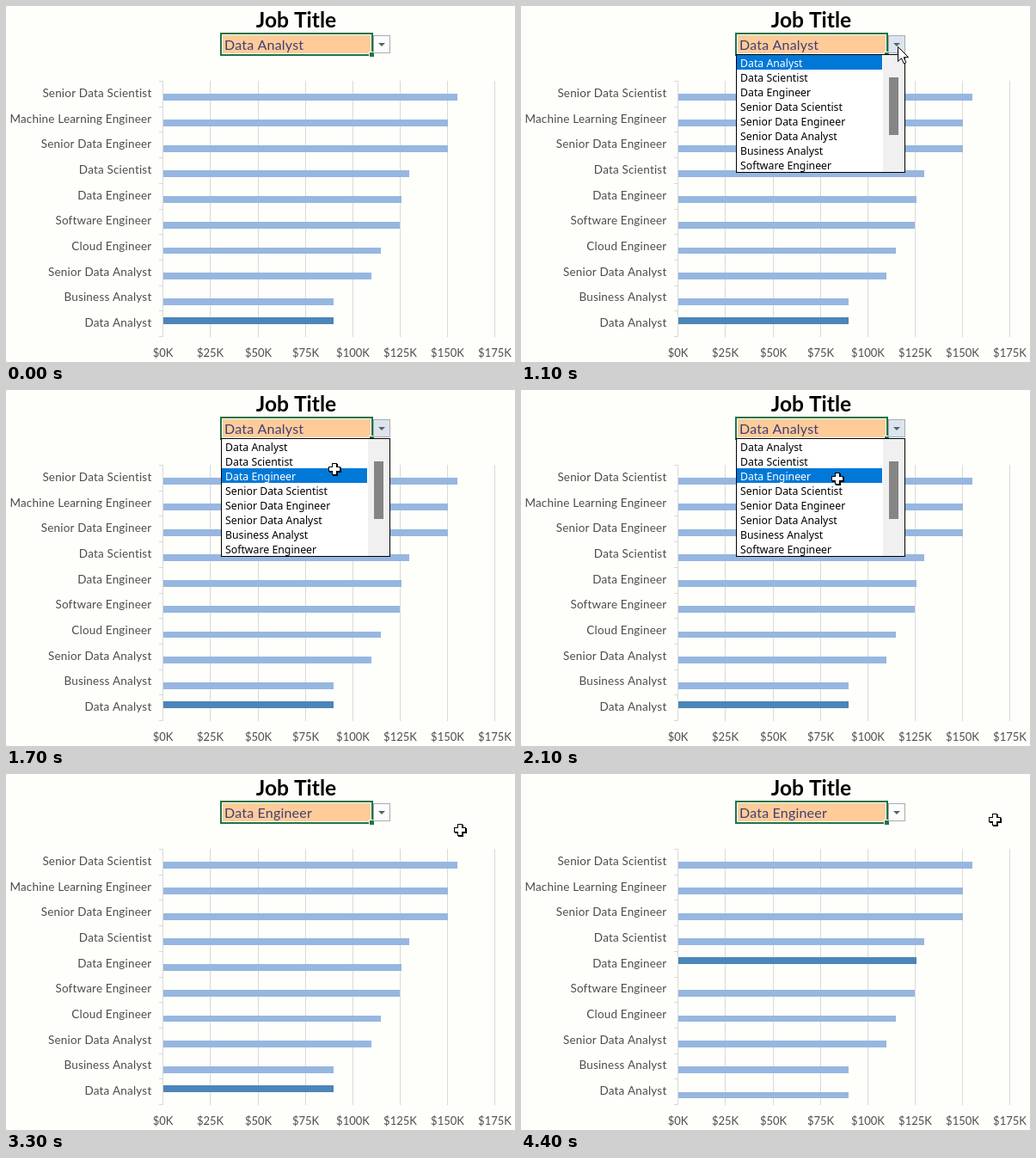
An HTML page with a canvas for the animation above (4.5 s loop, 592 by 414 pixels).

```html
<!DOCTYPE html>
<html lang="en">
<head>
<meta charset="utf-8">
<title>Job Title</title>
<style>
  html, body { margin: 0; width: 100%; height: 100%; overflow: hidden; background: #fefffb; }
  canvas { display: block; }
</style>
</head>
<body>
<canvas id="stage" width="592" height="414"></canvas>
<script>
const ctx = document.getElementById('stage').getContext('2d');
const LOOP = 4500, STEP = 100;
const LEFT = 182.3, TOP = 87.5, ROW = 29.7, BAR = 7.77, PER_K = 2.2057;
const OPEN = 1100, CLOSE = 2400, RECALC = 3400;

const salaries = [
  ['Senior Data Scientist', 155.3], ['Machine Learning Engineer', 150.2],
  ['Senior Data Engineer', 150.2], ['Data Scientist', 130],
  ['Data Engineer', 126], ['Software Engineer', 125],
  ['Cloud Engineer', 115], ['Senior Data Analyst', 110],
  ['Business Analyst', 90], ['Data Analyst', 90]
];
const options = ['Data Analyst', 'Data Scientist', 'Data Engineer', 'Senior Data Scientist',
  'Senior Data Engineer', 'Senior Data Analyst', 'Business Analyst', 'Software Engineer'];

// Pointer path: time, x, y
const path = [
  [200, 449, 2], [700, 440, 42], [900, 438, 47], [1300, 438, 47], [1500, 395, 81],
  [1900, 368, 103], [2400, 368, 103], [2700, 395, 87], [2800, 497, 73], [2900, 518, 71],
  [3100, 526, 67], [3300, 528, 65], [3600, 530, 64], [4200, 542, 58], [4400, 551, 53]
];

function pointerAt(t) {
  if (t < path[0][0]) return null;
  const next = path.findIndex(p => p[0] > t);
  if (next < 0) return path[path.length - 1].slice(1);
  const [t0, x0, y0] = path[next - 1], [t1, x1, y1] = path[next];
  const k = (t - t0) / (t1 - t0);
  return [Math.round(x0 + (x1 - x0) * k), Math.round(y0 + (y1 - y0) * k)];
}

function rect(x, y, w, h, color) {
  ctx.fillStyle = color;
  ctx.fillRect(x, y, w, h);
}

// Rectangle by its edges, snapped to whole pixels
function snapped(x0, y0, x1, y1, color) {
  const [l, t, r, b] = [x0, y0, x1, y1].map(Math.round);
  rect(l, t, r - l, b - t, color);
}

function frame(x, y, w, h, fill, border, width = 1) {
  rect(x, y, w, h, border);
  rect(x + width, y + width, w - 2 * width, h - 2 * width, fill);
}

function text(str, x, y, font, color, align = 'left', spacing = 0) {
  ctx.font = font;
  ctx.fillStyle = color;
  ctx.textAlign = align;
  ctx.letterSpacing = spacing + 'px';
  ctx.fillText(str, x, y);
}

function polygon(points, fill) {
  ctx.beginPath();
  points.forEach(([x, y]) => ctx.lineTo(x, y));
  ctx.closePath();
  ctx.fillStyle = fill;
  ctx.fill();
}

function drawChart(selected) {
  for (let i = 0; i <= 7; i++) {
    const x = Math.round(LEFT + i * 25 * PER_K);
    rect(x, 87, 1, 298, '#d9d9d9');
    text(`$${i * 25}K`, x + 0.5, 408, '13px Lato, sans-serif', '#4d4d4d', 'center');
  }
  for (let i = 0; i <= 10; i++) rect(178, Math.floor(TOP + i * ROW), 4, 1, '#d9d9d9');
  salaries.forEach(([name, value], i) => {
    const mid = TOP + (i + 0.5) * ROW;
    const active = name === selected;
    const top = active ? mid - BAR : mid;
    text(name, 169.4, Math.floor(mid) + 4, '13.5px Lato, sans-serif', '#4d4d4d', 'right', 0.18);
    snapped(LEFT + 1, top, LEFT + value * PER_K, top + BAR, active ? '#4d85b8' : '#97b6e0');
  });
}

function drawCell(value, hot) {
  text('Job Title', 337.5, 25, 'bold 24.6px Lato, sans-serif', '#000', 'center');
  frame(249, 31, 178, 27, '#fff', '#217346', 2);
  rect(252, 34, 172, 21, '#ffcc99');
  rect(422, 53, 6, 6, '#fefffb');
  rect(423, 54, 5, 5, '#217346');
  text(value, 254, 51, '16px Lato, sans-serif', '#3f3f76', 'left', 0.2);
  frame(427, 34, 20, 21, hot ? '#dbe5ef' : '#fbfcfd', '#ababab');
  polygon([[433, 43], [441, 43], [437, 47]], '#606060');
}

function drawList(hover) {
  frame(250, 56, 197, 138, '#fff', '#000');
  rect(421, 57, 25, 136, '#f0f0f0');
  rect(428, 83, 11, 67, '#858585');
  options.forEach((name, i) => {
    if (i === hover) rect(251, 57 + 17 * i, 169, 17, '#0078d7');
    text(name, 255, 71 + 17 * i, '12.3px "Noto Sans", sans-serif', i === hover ? '#fff' : '#000');
  });
}

function drawCross(x, y) {
  const plus = (arm, half, shift, color) => {
    rect(x - arm + shift, y - half + shift, 2 * arm, 2 * half, color);
    rect(x - half + shift, y - arm + shift, 2 * half, 2 * arm, color);
  };
  plus(7, 3, 1, '#000');
  plus(7, 3, 0, '#000');
  plus(6, 2, 0, '#fff');
}

function drawArrow(x, y) {
  const shape = [[0, 0], [0, 17], [4, 13.2], [6.8, 19.5], [9.4, 18.3], [6.7, 12.2], [12, 12]];
  polygon(shape.map(([dx, dy]) => [x + 0.5 + dx, y + 0.5 + dy]), '#fff');
  ctx.strokeStyle = '#000';
  ctx.lineWidth = 1;
  ctx.stroke();
}

function draw(now) {
  const t = Math.floor(now % LOOP / STEP) * STEP;
  const pointer = pointerAt(t);
  const open = t >= OPEN && t < CLOSE;
  const [x, y] = pointer || [0, 0];
  const onButton = x >= 427 && x < 447 && y >= 34 && y < 55;

  rect(0, 0, 592, 414, '#fefffb');
  drawChart(t < RECALC ? 'Data Analyst' : 'Data Engineer');
  drawCell(t < CLOSE ? 'Data Analyst' : 'Data Engineer', onButton || open);
  if (open) drawList(Math.max(0, Math.floor((y - 57) / 17)));
  if (pointer) (onButton ? drawArrow : drawCross)(x, y);
  requestAnimationFrame(draw);
}
requestAnimationFrame(draw);
</script>
</body>
</html>
```
